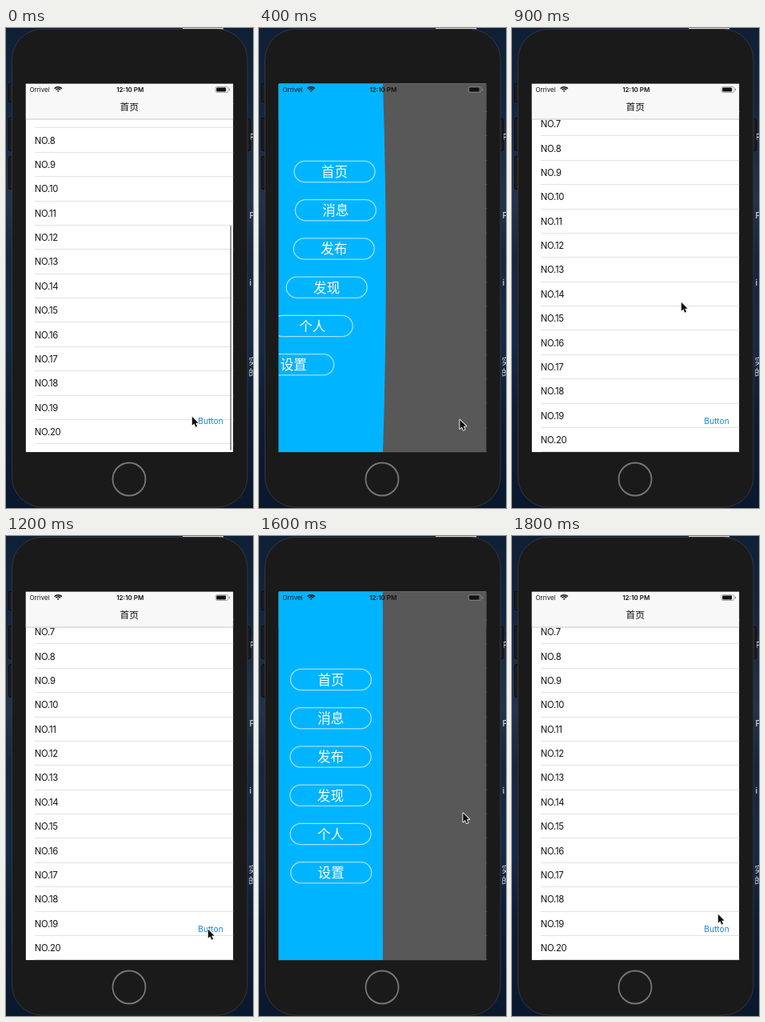
An HTML page with a canvas for the animation above (1.9 s loop, 309x600 px).

```html
<!DOCTYPE html>
<html lang="zh">
<head>
<meta charset="utf-8">
<style>
  html, body { margin: 0; width: 100%; height: 100%; overflow: hidden; background: #0c1528; }
  canvas { display: block; }
</style>
</head>
<body>
<canvas id="stage" width="309" height="600"></canvas>
<script>
const ctx = document.getElementById('stage').getContext('2d');
const LOOP = 1900, STEP = 100;
const LATIN = 'Inter, Roboto, sans-serif';
const CJK = '"Noto Sans CJK SC", "Noto Sans CJK", sans-serif';
const SCREEN = { x: 24.6, y: 69.6, w: 259.7, h: 460.7 };
const MENU_W = 130.4, MENU_TRAVEL = 167;
const MENU = ['首页', '消息', '发布', '发现', '个人', '设置'];

// The menu plays at double speed; times below are in loop milliseconds.
const SPEED = 2;
const CYCLES = [{ open: 248, close: 720 }, { open: 1266, close: 1620 }];
const POINTER = [
  [0, 232, 485], [200, 250.5, 489], [400, 250.5, 489], [600, 211, 341], [900, 211, 342],
  [1200, 252, 491], [1300, 252, 492], [1500, 254.5, 346], [1600, 254.5, 345.5], [1800, 257, 472]
];

const clamp = v => Math.max(0, Math.min(1, v));

// Remaining distance (1 to 0) of a damped spring, s seconds after release.
function spring(damping, s) {
  if (s <= 0) return 1;
  const decay = 9.36, root = Math.sqrt(1 - damping * damping);
  const angle = decay / damping * root * s;
  return Math.exp(-decay * s) * (Math.cos(angle) + damping / root * Math.sin(angle));
}

const edgePull = s => (spring(0.8, s) - spring(0.5, s)) * 138;

function text(str, x, y, size, color, { font = LATIN, weight = 400, align = 'left', spacing = 0 } = {}) {
  ctx.font = `${weight} ${size}px ${font}`;
  ctx.letterSpacing = spacing + 'px';
  ctx.textAlign = align;
  ctx.fillStyle = color;
  ctx.fillText(str, x, y);
}

function rect(x, y, w, h, color) {
  ctx.fillStyle = color;
  ctx.fillRect(x, y, w, h);
}

function pill(x, y, w, h, r, fill, stroke, lineWidth = 1) {
  ctx.beginPath();
  ctx.roundRect(x, y, w, h, r);
  if (fill) { ctx.fillStyle = fill; ctx.fill(); }
  if (stroke) { ctx.strokeStyle = stroke; ctx.lineWidth = lineWidth; ctx.stroke(); }
}

function drawDesktop() {
  const sky = ctx.createLinearGradient(0, 0, 0, 600);
  [[0, '#0f2036'], [0.15, '#12253f'], [0.36, '#22334d'], [0.48, '#16263f'],
   [0.65, '#152a48'], [0.8, '#0d1d36'], [1, '#0a182e']].forEach(([p, c]) => sky.addColorStop(p, c));
  rect(0, 0, 309, 600, sky);
  rect(221, 0, 51, 1.5, '#d8d8d8');
  [['P', 140], ['P', 238], ['i', 322]].forEach(([s, y]) => text(s, 304.5, y, 10.5, '#d5d8de', { weight: 500 }));
  [['实', 421], ['的', 435]].forEach(([s, y]) => text(s, 303.5, y, 11, '#d5d8de', { font: CJK }));
}

function drawPhone() {
  [[3, 69, 24], [3, 112, 42], [3, 160, 42], [299, 113, 41]].forEach(([x, y, h]) =>
    pill(x + 0.5, y + 0.5, 6, h - 1, 1.5, '#1d1d1e', '#0b0c10'));
  pill(7.5, 1.5, 294.5, 597.5, 38, '#1a1a1a', '#353538');
  ctx.beginPath();
  ctx.arc(154, 564, 20.5, 0, 2 * Math.PI);
  ctx.strokeStyle = '#777';
  ctx.lineWidth = 1.8;
  ctx.stroke();
}

function drawList(t) {
  rect(SCREEN.x, SCREEN.y, SCREEN.w, SCREEN.h, '#fff');
  const bounce = -10 * Math.exp(-t / 80);
  for (let n = 6; n <= 21; n++) {
    const y = 514.7 + (n - 20) * 30.375 + bounce;
    if (n <= 20) text('NO.' + n, 35.8, y + 4.4, 11.3, '#111', { spacing: -0.25 });
    rect(36, Math.round(y + 14.6), 249, 1, '#e2e2e2');
  }
  ctx.globalAlpha = clamp(1 - t / 250);
  pill(280.4, 247, 1.5, 281, 0.7, '#777');
  ctx.globalAlpha = 1;
  text('Button', 240.3, 495.2, 10.2, '#1a84d8');
  rect(SCREEN.x, SCREEN.y, SCREEN.w, 114 - SCREEN.y, '#f8f8f8');
  rect(SCREEN.x, 113.5, SCREEN.w, 1, '#c8c8c8');
  text('首页', 154.3, 103.4, 11.8, '#111', { font: CJK, weight: 500, align: 'center' });
}

function menuState(t) {
  const cycle = CYCLES.find(c => t >= c.open && t < c.close + 300 / SPEED);
  if (!cycle) return null;
  const opened = (t - cycle.open) * SPEED / 1000;
  const closed = Math.max(0, (t - cycle.close) * SPEED / 1000);
  const shown = clamp(opened / 0.3) - clamp(closed / 0.3);
  return { opened, shown, pull: closed > 0 ? -edgePull(closed) : edgePull(opened) };
}

function drawMenu({ opened, shown, pull }) {
  ctx.globalAlpha = shown;
  rect(SCREEN.x, SCREEN.y, SCREEN.w, SCREEN.h, '#585858');
  ctx.globalAlpha = 1;

  ctx.save();
  ctx.translate(SCREEN.x - MENU_TRAVEL * (1 - shown), SCREEN.y);
  ctx.beginPath();
  ctx.moveTo(-50, 0);
  ctx.lineTo(MENU_W, 0);
  ctx.quadraticCurveTo(MENU_W + pull, SCREEN.h / 2, MENU_W, SCREEN.h);
  ctx.lineTo(-50, SCREEN.h);
  ctx.fillStyle = '#00b4ff';
  ctx.fill();
  MENU.forEach((label, i) => {
    const x = 65.4 - 62 * spring(0.6, opened - i * 0.05);
    const y = 109.9 + i * 48.25;
    pill(x - 50.5, y - 13.2, 101, 26.4, 13.2, null, '#a0e0ff', 1.3);
    text(label, x, y + 6.3, 16.6, '#fff', { font: CJK, align: 'center' });
  });
  ctx.restore();
}

function drawStatusBar() {
  text('Orrivel', 29.5, 79.8, 8, '#111');
  text('12:10 PM', 155.3, 79.9, 8, '#111', { weight: 600, align: 'center' });
  ctx.strokeStyle = '#111';
  ctx.lineWidth = 1.5;
  [6.3, 3.9, 1.2].forEach(r => {
    ctx.beginPath();
    ctx.arc(65.2, 80, r, -Math.PI * 0.76, -Math.PI * 0.24);
    ctx.stroke();
  });
  pill(262, 73.5, 16, 7, 2, null, '#8a8a8a', 0.7);
  pill(263.2, 74.6, 12, 4.8, 1, '#111');
  rect(279, 75.7, 1, 2.6, '#8a8a8a');
}

function drawPointer(t) {
  const i = Math.max(1, POINTER.findIndex(p => p[0] >= t));
  const [t0, x0, y0] = POINTER[i - 1], [t1, x1, y1] = POINTER[i];
  const p = clamp((t - t0) / (t1 - t0)), k = p * p * (3 - 2 * p);
  ctx.save();
  ctx.translate(x0 + (x1 - x0) * k + 0.8, y0 + (y1 - y0) * k + 0.8);
  ctx.scale(0.88, 0.88);
  const arrow = new Path2D('M0 0V12.5L2.9 9.8L5 14.6L7.2 13.6L5.1 9H9Z');
  ctx.fillStyle = '#111';
  ctx.strokeStyle = '#fff';
  ctx.lineWidth = 2;
  ctx.lineJoin = 'round';
  ctx.stroke(arrow);
  ctx.fill(arrow);
  ctx.restore();
}

function draw(t) {
  drawDesktop();
  drawPhone();
  ctx.save();
  ctx.beginPath();
  ctx.rect(SCREEN.x, SCREEN.y, SCREEN.w, SCREEN.h);
  ctx.clip();
  drawList(t);
  const menu = menuState(t);
  if (menu) drawMenu(menu);
  drawStatusBar();
  ctx.restore();
  drawPointer(t);
}

const start = performance.now();
function tick() {
  const t = (performance.now() - start) % LOOP;
  draw(Math.floor(t / STEP) * STEP);
  requestAnimationFrame(tick);
}
tick();
</script>
</body>
</html>
```
